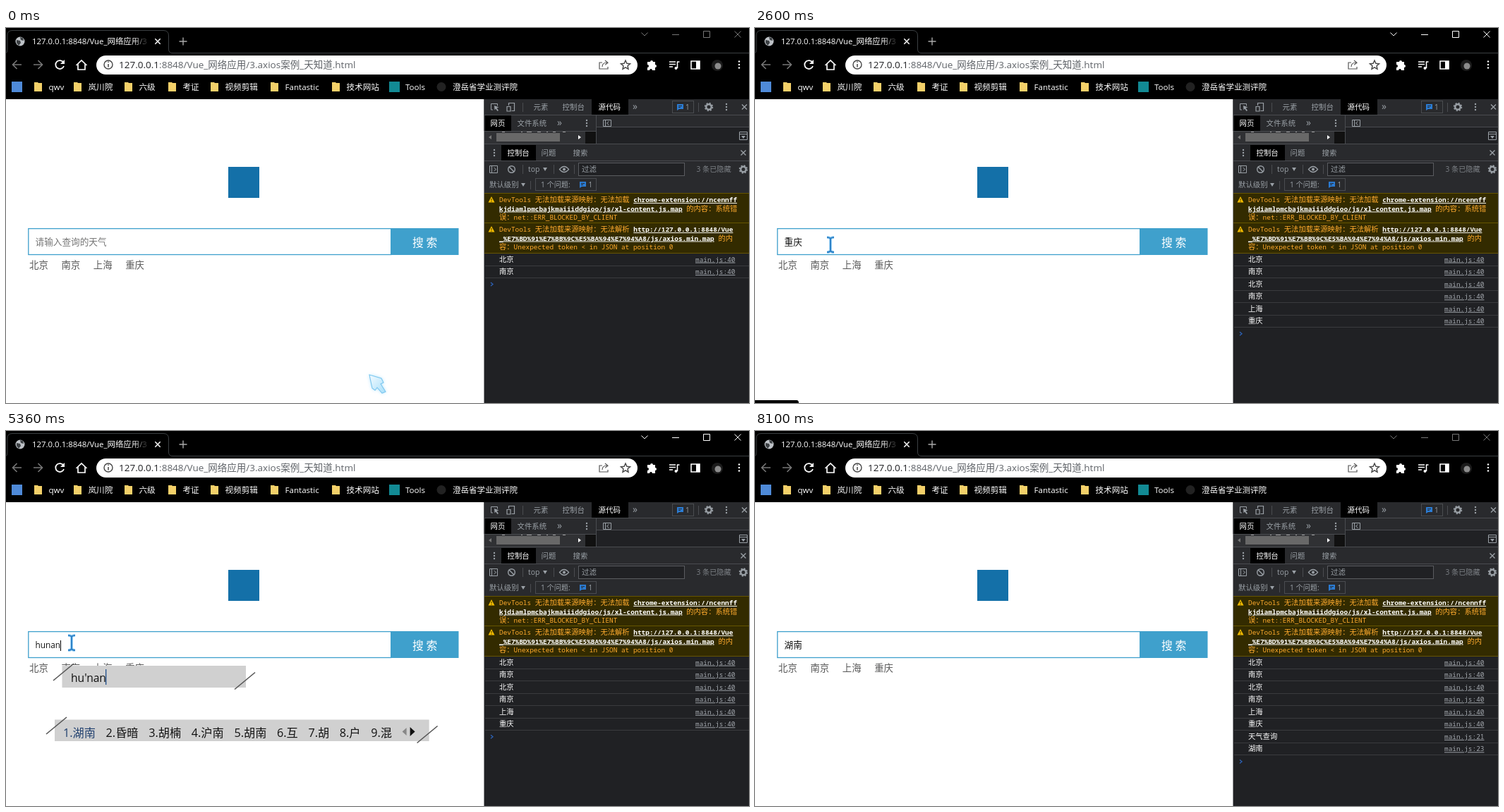
Animation, 1053 px wide and 532 px high, one loop 8.17 s. Source, as an HTML page:

```html
<!DOCTYPE html>
<html lang="zh">
<head>
<meta charset="utf-8">
<title>Weather search</title>
<style>
html, body { margin: 0; width: 100%; height: 100%; overflow: hidden; background: #fff; }
svg { display: block; }
text { font-family: "Open Sans", "Noto Sans CJK SC", "Noto Sans CJK", sans-serif; white-space: pre; }
.mono { font-family: "Noto Sans Mono", "Noto Sans CJK SC", "Noto Sans CJK", monospace; font-size: 9.42px; font-weight: 500; }
.cjk { font-size: 10.3px; }
.link { fill: #fff; font-weight: 600; text-decoration: underline; }
.src { fill: #a4a9af; text-decoration: underline; }
</style>
</head>
<body>
<svg width="1053" height="532">
  <defs>
    <linearGradient id="fade"><stop stop-opacity="0"/><stop offset="1"/></linearGradient>
    <linearGradient id="ice" x2="1" y2="1"><stop stop-color="#f4fbff"/><stop offset="1" stop-color="#a8dffa"/></linearGradient>
    <filter id="glow" x="-50%" y="-50%" width="200%" height="200%"><feGaussianBlur stdDeviation="2.5"/></filter>
  </defs>
  <g id="base"></g>
  <g id="live"></g>
</svg>
<script>
const LOOP = 8170;
const $ = id => document.getElementById(id);

const rect = (x, y, w, h, fill, extra = '') =>
  `<rect x="${x}" y="${y}" width="${w}" height="${h}" fill="${fill}" ${extra}/>`;
const box = (x, y, w, h, stroke, fill = 'none') =>
  rect(x + .5, y + .5, w - 1, h - 1, fill, `stroke="${stroke}"`);
const path = (d, stroke, w = 1, fill = 'none') =>
  `<path d="${d}" stroke="${stroke}" stroke-width="${w}" fill="${fill}"/>`;
const shape = (d, fill) => `<path d="${d}" fill="${fill}"/>`;
const dot = (x, y, r, fill, extra = '') => `<circle cx="${x}" cy="${y}" r="${r}" fill="${fill}" ${extra}/>`;
// cy is the middle of the line
const text = (x, cy, size, fill, s, extra = '') =>
  `<text x="${x}" y="${cy + size * .37}" font-size="${size}" fill="${fill}" ${extra}>${s}</text>`;
const mono = (x, cy, fill, s, cls = '') =>
  `<text class="mono ${cls}" x="${x}" y="${cy + 3.6}" fill="${fill}">` +
  s.replace(/[^\x00-\xff]+/g, m => `<tspan class="cjk">${m}</tspan>`) + '</text>';
const link = s => `<tspan class="link">${s}</tspan>`;
const cross = (x, y, r, c, w = 1) => path(`M${x - r} ${y - r}l${2 * r} ${2 * r}m0 ${-2 * r}l${-2 * r} ${2 * r}`, c, w);
const dots = (x, y, c, gap = 4) => [-gap, 0, gap].map(d => dot(x, y + d, 1.2, c)).join('');
const gear = (x, y) => dot(x, y, 3.7, 'none', 'stroke="#9aa0a6" stroke-width="2.4"') +
  dot(x, y, 5.4, 'none', 'stroke="#9aa0a6" stroke-width="1.6" stroke-dasharray="2.2 2.04"');
const badge = (x, y) => shape(`M${x} ${y}h9v7h-6l-3 2z`, '#2b7cd3') +
  path(`M${x + 2} ${y + 2.5}h5m-5 2h3`, '#292a2d');
const hline = (x, y, w, c) => rect(x, y, w, 1, c);
const down = (x, y) => shape(`M${x} ${y}h6l-3 5z`, '#9aa0a6');
const medium = 'font-weight="500"';

function browser() {
  let s = rect(0, 0, 1053, 101, '#000') +
    path('M0 35.5Q2 35 2 30V10Q2 3.5 9 3.5H223Q230.500 3.500 230.500 11V30Q230.500 35.500 236 35.500H1053', '#3c4043') +
    dot(20, 19, 6.5, '#bdc1c6') + shape('M15 17l5 1 1 3-3 4-3-4zM20 13l4 1 1 4-4-1z', '#3c4043') +
    text(37, 19, 11.4, '#fff', '127.0.0.1:8848/Vue_网络应用/3', medium) +
    rect(178, 8, 26, 22, 'url(#fade)') + cross(215, 19, 3.7, '#fff', 1.5) +
    path('M245.500 19h11m-5.500-5.500v11', '#aaa', 1.4);

  s += path('M22 52H9.500m6-6l-6 6 6 6', '#777', 1.6) + path('M39 52h12.500m-6-6l6 6-6 6', '#777', 1.6) +
    path('M81.500 49A6 6 0 1 0 82 54', '#fff', 1.8) + shape('M83 45v6h-6z', '#fff') +
    path('M99.500 53l7.500-7 7.500 7m-12.500-2v8h10v-8', '#fff', 1.7) +
    rect(128, 39, 767, 27, '#fff', 'rx="13.5"') +
    dot(145, 52, 6, 'none', 'stroke="#444" stroke-width="1.4"') + path('M145 51v4.500m0-8v1.500', '#444', 1.5) +
    text(160, 52, 13.5, '#5f6368', '<tspan fill="#202124">127.0.0.1</tspan>:8848/Vue_网络应用/3.axios案例_天知道.html') +
    path('M845 49h-4v9h12v-3m-8 0q0-6 7-6m-3-3l4 3.200-4 3.200', '#555', 1.2) +
    path('M878 46l1.900 4.300 4.600.4-3.500 3 1 4.600-4-2.400-4 2.400 1-4.600-3.500-3 4.600-.4z', '#444', 1.4) +
    shape('M909 48h4a2 2 0 1 1 4 0h3v4a2 2 0 1 1 0 4v4h-4a2 2 0 1 0-4 0h-3v-4a2 2 0 1 0 0-4z', '#fff') +
    path('M940 48h9m-9 3.500h9m-9 3.500h5m6.500 2v-9h3', '#fff', 1.6) + dot(949.500, 57, 2, '#fff') +
    path('M971 47h12v11h-12z', '#fff', 1.6) + rect(978, 47, 5, 11, '#fff') +
    dot(1008, 53, 8, '#1c1c1c') + dot(1009, 54, 4.5, '#8c8c8c') + dots(1039, 52, '#fff', 4.5);

  s += rect(8, 76, 15, 15, '#4f8ad8');
  [[39, 'qwv'], [95, '岚川院'], [167, '六级'], [229, '考证'], [289, '视频剪辑'], [374, 'Fantastic'], [461, '技术网站']]
    .forEach(([x, name]) => s += shape(`M${x + 1} 77h5l1 1h5v12h-11z`, '#f3d069') +
      text(x + 21.500, 83.500, 11.6, '#fff', name, medium));
  return s + rect(543, 76, 15, 15, '#128a94') + text(566, 83.500, 11.6, '#fff', 'Tools', medium) +
    dot(617, 83.500, 6.5, '#222') + text(633, 83.500, 11.5, '#fff', '澄岳省学业测评院', medium);
}

function page() {
  return rect(0, 101, 678, 431, '#fff') + rect(315, 197, 44, 44, '#1470a8') +
    rect(31.800, 284.600, 514, 36.900, 'none', 'stroke="#3fa0cc" stroke-width="1.3"') +
    rect(545, 284, 96.500, 38, '#3fa0cc') +
    text(576, 304, 15.8, '#fff', '搜') + text(595.500, 304, 15.8, '#fff', '索') +
    ['北京', '南京', '上海', '重庆'].map((c, i) => text(33 + 45.4 * i, 336.500, 13.4, '#585858', c)).join('');
}

function devtools() {
  const g = '#9aa0a6', bar = '#292a2d', edge = '#4a4c50';
  let s = rect(677.500, 101, 375.500, 431, '#202124') + rect(677.500, 101, 375.500, 45, bar) +
    // main tabs
    rect(830, 101, 52, 22, '#000') + hline(678, 123, 375, edge) +
    path('M690 116h-2.500v-8.500h9v3', g) + shape('M692 110l6.500 2.500-3 1 2.500 3.500-1.500 1-2.500-3.500-1.500 2z', g) +
    path('M712.500 110v-3.500h8v11h-4m-6.500-6h5v6.500h-5z', g, 1.2) +
    rect(732, 106, 1, 13, edge) +
    text(747.500, 112, 10.5, g, '元素') + text(788.500, 112, 10.5, g, '控制台') + text(839.500, 112, 10.5, '#fff', '源代码') +
    text(888, 111, 14, g, '»') + box(944, 103, 31, 18, edge) + badge(951, 108) + text(963, 112, 10, g, '1') +
    rect(981, 106, 1, 13, edge) + gear(996, 112) + dots(1021, 112, g) + cross(1046.500, 112, 3.5, g, 1.4) +
    // sources pane
    rect(679, 124, 37, 22, '#000') + text(686.500, 135, 10.4, '#fff', '网页') + text(724.500, 135, 10.4, g, '文件系统') +
    text(781, 134, 14, g, '»') + dots(823, 135, g) +
    rect(837, 141, 216, 23, '#202124') + hline(837, 140, 216, edge) + hline(678, 146, 159, edge) +
    path('M846.500 130.500h11v9h-11zm3 0v9m5-7l-3 2.500 3 2.500', g) +
    rect(678, 147, 159, 17, '#303134') + rect(695, 149, 90, 12, '#686868') + rect(821, 147, 15, 17, '#111') +
    path('M703 147.500h4m23 0h2m6 0h7m8 0h5m8 0h2m7 0h4m10 0h4', '#bbb', .8) +
    shape('M688 152v6l-4-3z', '#777') + shape('M811 152v6l4-3z', '#fff') + rect(836, 124, 1, 40, edge) +
    path('M1039.500 147.500h11v11h-11zm0 3h11', g) + shape('M1042 153h6l-3 4z', g) +
    // drawer tabs
    hline(678, 164, 375, edge) + rect(678, 165, 375, 69, bar) + rect(702, 166, 49, 22, '#000') + dots(692, 177, g) +
    text(710.500, 177, 10.4, '#fff', '控制台') + text(758.500, 177, 10.4, g, '问题') + text(803.500, 177, 10.4, g, '搜索') +
    cross(1045, 177, 3.5, g, 1.4) + hline(678, 188, 375, edge) +
    // console filters
    path('M685.500 195.500h11v10h-11zm3 0v10m3-7.500l3 2.500-3 2.500', g) +
    dot(716.500, 200.500, 4.8, 'none', `stroke="${g}" stroke-width="1.4"`) + path('M713 197l7 7', g, 1.4) +
    rect(732, 194, 1, 13, edge) + text(740, 200, 10.4, g, 'top') + down(761, 198) + rect(776, 194, 1, 13, edge) +
    path('M784.500 200.500q6.500-8 13 0q-6.500 8-13 0z', g, 1.3) + dot(791, 200.500, 2, g) + rect(805, 194, 1, 13, edge) +
    box(811, 191, 151, 19, '#5a5c60', '#202124') + text(816, 200.500, 10.4, g, '过滤') +
    text(978.500, 200.500, 10.2, '#7d8186', '3 条已隐藏') + gear(1045, 200.500) +
    text(685, 222.500, 10.4, g, '默认级别') + down(730, 220) + rect(743, 217, 1, 12, edge) +
    box(750, 213, 87, 18, edge) + text(758, 222.500, 10.2, g, '1 个问题:') + badge(813, 218) + text(825.500, 222.500, 10, g, '1');
  // warnings
  const amber = '#ffab2e';
  const warning = (y, lines) => rect(678, y, 375, 42, '#332b00') + hline(678, y - 1, 375, '#665500') +
    hline(678, y + 42, 375, '#665500') + shape(`M688 ${y + 4}l4.500 8.500h-9z`, '#f4bd00') +
    path(`M688 ${y + 7}v2.500m0 1v1.200`, '#332b00') + lines.map((l, i) => mono(699, y + 8.500 + 12.4 * i, amber, l)).join('');
  return s + warning(235, [
    'DevTools 无法加载来源映射：无法加载 ' + link('chrome-extension://ncennff'),
    link('kjdiamlpmcbajkmaiiiddgioo/js/xl-content.js.map') + ' 的内容：系统错',
    '误：net::ERR_BLOCKED_BY_CLIENT'
  ]) + warning(277, [
    'DevTools 无法加载来源映射：无法解析 ' + link('http://127.0.0.1:8848/Vue'),
    link('_%E7%BD%91%E7%BB%9C%E5%BA%94%E7%94%A8/js/axios.min.map') + ' 的内',
    '容：Unexpected token &lt; in JSON at position 0'
  ]);
}

const typed = [[0, ''], [900, '北京'], [1420, '南京'], [1950, '上海'], [2480, '重庆'], [3620, '重'], [3820, ''],
  [4700, 'h'], [4770, 'hu'], [5160, 'hun'], [5290, 'huna'], [5360, 'hunan'], [5750, '湖南']];
const logCount = [[0, 2], [900, 3], [1420, 4], [1950, 5], [2480, 6], [6100, 8]];
const caretOn = [[2880, 3420], [3620, 4500], [4700, 6300], [6830, 7360], [7910, 8100]];
const logs = ['北京', '南京', '北京', '南京', '上海', '重庆', '天气查询', '湖南'];
const candidates = {
  h: '哈哈 好的 和 会 还是 很 后 或 号',
  hu: '互 胡 户 虎 湖 呼 乎 护 糊',
  hun: '混 婚 昏 魂 浑 荤 馄 诨 珲',
  huna: '湖南 胡娜 护拿 互 胡 户 虎 湖 混',
  hunan: '湖南 昏暗 胡楠 沪南 胡南 互 胡 户 混'
};
// start, end, steps, x, y, pointer
const moves = [
  [0, 0, 1, 527, 506, 'arrow'], [70, 70, 1, 200, 350, 'hand'], [280, 620, 6, 57, 348, 'hand'],
  [960, 1090, 3, 91, 351, 'hand'], [1480, 1550, 2, 107, 352, 'hand'], [1610, 1740, 3, 140, 350, 'hand'],
  [2080, 2270, 4, 182, 350, 'hand'], [2530, 2600, 2, 107, 307, 'beam'], [2670, 2730, 2, 93, 300, 'beam'],
  [7030, 7290, 5, 676, 350, 'arrow'], [7360, 7490, 3, 628, 412, 'arrow'], [7560, 7770, 4, 525, 560, 'arrow']
];

const glowing = d => `<path d="${d}" fill="#7fd0fb" opacity=".7" filter="url(#glow)"/>` + path(d, '#7cc6ee', 1.1, 'url(#ice)');
const beam = 'M-5-10q4 0 5 2q1-2 5-2M-5 11q4 0 5-2q1 2 5 2M0-8V9';
const pointers = {
  arrow: glowing('M-12-14L5-9 8-3 4-1 11 10 6 12-1 4-4 8-8 5z'),
  hand: glowing('M-7-11q3-2 4 1l1 4q3-2 4 0q3-1 4 1q3 0 2.500 5l-1.500 6q-1 5-6 5h-2q-4 0-6-5l-2-6q1-2 2 0z'),
  beam: path(beam, '#a5d8f8', 4) + path(beam, '#2f83c8', 2)
};

const at = (track, t) => track.filter(k => k[0] <= t).pop()[1];

function pointer(t) {
  const i = moves.filter(m => m[0] <= t).length - 1;
  const [start, end, n, x, y, kind] = moves[i], from = moves[Math.max(0, i - 1)];
  const k = Math.min(n, 1 + Math.floor((t - start) * (n - 1) / (end - start || 1) + .01)) / n;
  const px = from[3] + (x - from[3]) * k, py = from[4] + (y - from[4]) * k;
  return `<g transform="translate(${px.toFixed(1)} ${py.toFixed(1)})">${pointers[kind]}</g>`;
}

function consoleLog(n) {
  let s = '';
  for (let i = 0; i < n; i++) {
    const y = 328 + 17.55 * i;
    s += mono(699, y, '#fff', logs[i]) + mono(977, y, '', i < 6 ? 'main.js:40' : i < 7 ? 'main.js:21' : 'main.js:23', 'src') +
      hline(679, Math.round(y + 8.6), 374, '#3a3b3e');
  }
  return s + path(`M687 ${328 + 17.55 * n - 2}l3 2.500-3 2.500`, '#2c62b8', 1.3);
}

function ime(word) {
  const gray = '#d0d0d0';
  const slash = (x, y) => path(`M${x} ${y}l29-24`, '#555', 1.6);
  const end = word === 'hunan' ? 340 : word === 'huna' ? 328 : 320;
  let s = rect(79.500, 333, end - 79.500, 31, gray) + slash(67, 354) + slash(end - 16, 366.500) +
    text(92, 350, 15.6, '#111', word.replace('hun', word.length > 3 ? "hu'n" : 'hun'), 'id="comp"') +
    rect(0, 338, 1.3, 22, '#1f4e8c', 'id="compCaret"');
  let x = 81, row = '';
  candidates[word].split(' ').forEach((c, i) => {
    row += text(x, 428, 16.2, i ? '#111' : '#1f3f6e', `${i + 1}.${c}`);
    x += 28.2 + 16.2 * c.length;
  });
  return s + rect(69, 409.500, x - 31, 30.500, gray) + slash(57, 430) + slash(x + 21, 442.500) + row +
    shape(`M${x + 6} 421v11l-6-5.500z`, '#888') + shape(`M${x + 11} 420v13l7-6.500z`, '#111');
}

function scene(t) {
  const word = at(typed, t), latin = /^h/.test(word);
  const win = t >= 830 && t < 8100 ? '#fff' : '#777';
  let s = path('M900.500 6.500l4.500 4.500 4.500-4.500M944 9.500h10M988.500 4.500h9v9h-9z', win) + cross(1037, 9, 4.5, win);
  s += word ? text(41.500, 303.500, latin ? 11.8 : 12.7, '#111', word, 'id="word"')
            : text(41.500, 303.500, 12.65, '#757575', '请输入查询的天气');
  if (caretOn.some(([a, b]) => a <= t && t < b)) s += rect(42, 297, 1, 15, '#000', 'id="caret"');
  if (t >= 830 && t < 2880) s += shape('M0 528h59q3 0 3 4H0z', '#000');
  s += consoleLog(at(logCount, t));
  if (latin) s += ime(word);
  return s + pointer(t);
}

$('base').innerHTML = browser() + page() + devtools();
let shown = '';

function draw() {
  const next = scene(performance.now() % LOOP);
  if (next !== shown) {
    $('live').innerHTML = shown = next;
    const put = (caret, label, x) => {
      if ($(caret) && $(label)) $(caret).setAttribute('x', Math.round(x + $(label).getComputedTextLength()));
    };
    put('caret', 'word', 41.500);
    put('compCaret', 'comp', 91.500);
  }
  requestAnimationFrame(draw);
}
draw();
</script>
</body>
</html>
```
